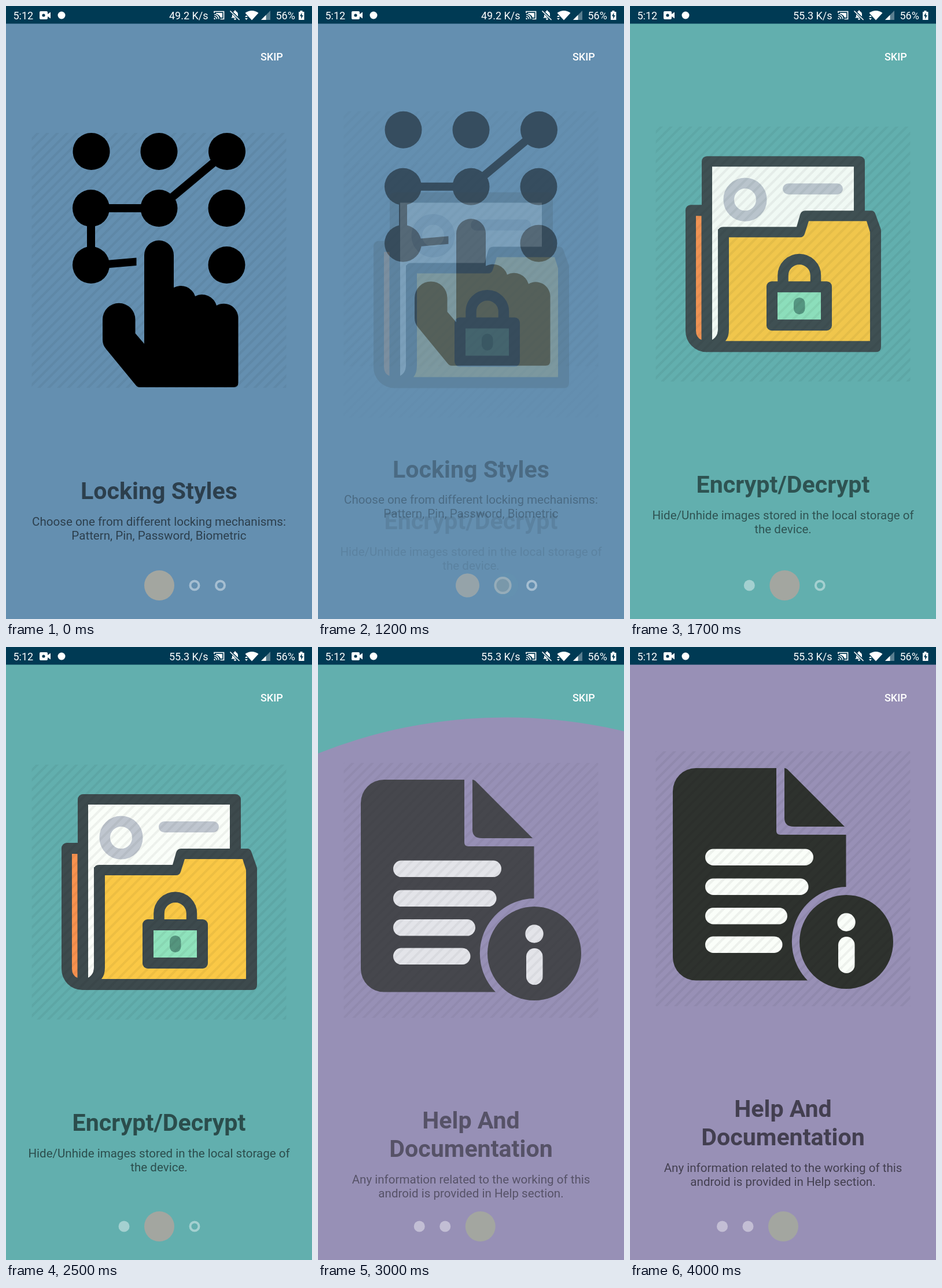
These frames come from a looping animation (529 px wide and 1058 px high, 4100 ms). An HTML page:

```html
<!DOCTYPE html>
<html lang="en">
<head>
<meta charset="utf-8">
<title>Onboarding</title>
<style>
  html, body { margin: 0; width: 100%; height: 100%; overflow: hidden; background: #648fb0; }
  svg { display: block; width: 529px; height: 1058px; }
  text { font-family: Roboto, sans-serif; }
  .title { font-size: 41.15px; font-weight: 700; }
  .sub { font-size: 20.57px; }
  .title, .sub { text-anchor: middle; fill: #000; fill-opacity: .56; }
  .bar text, .skip { font-size: 18px; fill: #fff; }
  .skip { font-weight: 500; }
  .ink { fill: #3d4a4d; }
  .doc { fill: #2e322e; }
  .paper { fill: #fafef9; }
  .line { fill: none; stroke: #000; stroke-width: 14; }
  .icon { fill: #fff; }
  .thin { fill: none; stroke: #fff; stroke-width: 1.7; }
</style>
</head>
<body>
<svg viewBox="0 0 529 1058">
  <defs>
    <pattern id="hatch" width="12" height="12" patternUnits="userSpaceOnUse" patternTransform="rotate(45)">
      <rect width="4" height="12" fill="#000" fill-opacity=".05"/>
    </pattern>
    <clipPath id="content"><rect width="529" height="974"/></clipPath>
  </defs>

  <rect width="529" height="1058" fill="#648fb0"/>
  <circle class="reveal" cx="325" cy="1000" fill="#62afae"/>
  <circle class="reveal" cx="325" cy="1000" fill="#9890b6"/>

  <g clip-path="url(#content)">
    <g class="page">
      <g>
        <circle cx="147.5" cy="251" r="32"/><circle cx="264.5" cy="251" r="32"/><circle cx="382" cy="251" r="32"/>
        <circle cx="147" cy="349" r="32"/><circle cx="264.5" cy="349" r="32"/><circle cx="381.5" cy="349" r="32"/>
        <circle cx="147" cy="447" r="32"/><circle cx="381.5" cy="447" r="32"/>
        <path class="line" d="M382 251L264.5 349H147V447"/>
        <path d="M150 441L225.5 434.5V448L150 454.5Z"/>
        <path d="M239 583V430A25.5 25.5 0 0 1 290 430V486A26 26 0 0 1 327 501A26 26 0 0 1 364 517A25 25 0 0 1 401.500 538V650Q401.500 658 393.500 658H231Q227 658 224 654L173 592Q167 585 167 576V541A28.200 28.200 0 0 1 223.500 541V565Z"/>
      </g>
      <rect x="44.500" y="219" width="440" height="440" fill="url(#hatch)"/>
      <text class="title" x="264.500" y="851">Locking Styles</text>
      <text class="sub" x="264.500" y="896.500">Choose one from different locking mechanisms:</text>
      <text class="sub" x="264.500" y="920.600">Pattern, Pin, Password, Biometric</text>
    </g>

    <g class="page">
      <path class="ink" d="M105 338H133V592H132A36 36 0 0 1 96 556V347A9 9 0 0 1 105 338Z"/>
      <path fill="#f9924f" d="M114 357H123.500V571Q114 567 114 555Z"/>
      <rect class="ink" x="124" y="254" width="282" height="330" rx="9"/>
      <path class="paper" d="M142 272H387V380H152V555Q152 567 142 571Z"/>
      <circle cx="199" cy="329" r="28.300" fill="none" stroke="#bfc6cf" stroke-width="18.500"/>
      <rect x="264" y="301" width="104" height="19" rx="9.500" fill="#bfc6cf"/>
      <path class="ink" d="M161 376H288L294 355Q296 348 303 348H417Q422 348 424 353L433 378Q434 380 434 384V583Q434 592 425 592H132V575Q152 570 152 553V385Q152 376 161 376Z"/>
      <path fill="#fac846" d="M171 394H294Q300 394 302 388L309 366H409L415 385V573H165Q171 566 171 553Z"/>
      <path d="M264.500 475V460A28.200 28.200 0 0 1 321 460V475" fill="none" stroke="#3d4a4d" stroke-width="18.500"/>
      <rect class="ink" x="236" y="470" width="113" height="85" rx="9"/>
      <rect x="255" y="489" width="75" height="47" fill="#8fe2bc"/>
      <rect x="283" y="498" width="19.500" height="29" rx="9.700" fill="#55957e"/>
      <rect x="44.500" y="203" width="440" height="440" fill="url(#hatch)"/>
      <text class="title" x="264.500" y="835">Encrypt/Decrypt</text>
      <text class="sub" x="264.500" y="881">Hide/Unhide images stored in the local storage of</text>
      <text class="sub" x="264.500" y="905">the device.</text>
    </g>

    <g class="page">
      <path class="doc" d="M114 209H253V317Q253 324 260 324H373.500V414A95 95 0 0 0 307 575.500H114A40 40 0 0 1 74 535.500V249A40 40 0 0 1 114 209Z"/>
      <path class="doc" d="M267 209Q269 209 272 211L371 310H283Q267 310 267 295Z"/>
      <circle class="doc" cx="374" cy="509" r="81"/>
      <g class="paper">
        <rect x="130" y="348.500" width="187" height="28.500" rx="14.200"/>
        <rect x="130" y="399.500" width="178.500" height="28.500" rx="14.200"/>
        <rect x="130" y="450" width="142" height="28.500" rx="14.200"/>
        <rect x="130" y="499.500" width="133.500" height="28.500" rx="14.200"/>
        <circle cx="374" cy="475" r="15.700"/>
        <rect x="360" y="500" width="28.500" height="63" rx="14.200"/>
      </g>
      <rect x="44.500" y="180" width="440" height="440" fill="url(#hatch)"/>
      <text class="title" x="264.500" y="811">Help And</text>
      <text class="title" x="264.500" y="859.500">Documentation</text>
      <text class="sub" x="264.500" y="905.500">Any information related to the working of this</text>
      <text class="sub" x="264.500" y="929.600">android is provided in Help section.</text>
    </g>
  </g>

  <g id="pager"></g>
  <text class="skip" x="440" y="93.500">SKIP</text>

  <g class="bar">
    <rect width="529" height="30.500" fill="#003a54"/>
    <text x="12.500" y="22.500">5:12</text>
    <path class="icon" d="M60 9H70Q72 9 72 11V14L77 10.500V21.500L72 18V21Q72 23 70 23H60Q58 23 58 21V11Q58 9 60 9Z"/>
    <circle cx="65" cy="16" r="2.600" fill="#003a54"/>
    <circle class="icon" cx="96" cy="16" r="6.500"/>
    <text id="speed" x="282" y="22.500">49.2 K/s</text>
    <path class="thin" d="M360 12V9.500H376.500V22.500H370.500M360 14.500A8 8 0 0 1 368 22.500M360 18A4.500 4.500 0 0 1 364.500 22.500"/>
    <path class="icon" d="M359.500 20.500A2.500 2.500 0 0 1 362 23H359.500ZM363 12H374V20H371Q369 14.500 363 13.500Z"/>
    <path class="icon" d="M389 20.500L391 18.500V14.500Q391 10 395 9V7.500H397V9Q401 10 401 14.500V18.500L403 20.500ZM394 21.500H398Q398 24 396 24T394 21.500Z"/>
    <path d="M388 8.500L404 24" stroke="#003a54" stroke-width="4"/>
    <path class="thin" d="M387.500 8.500L403.500 24"/>
    <path class="icon" d="M413.500 12Q425 4 436.500 12L425 24.500Z"/>
    <path class="icon" d="M413 19L415.500 16L418 19ZM413 21L415.500 24L418 21Z"/>
    <path class="icon" d="M457 8V24H441Z" fill-opacity=".35"/>
    <path class="icon" d="M449.500 15.500V24H441Z"/>
    <text x="466.500" y="22.500">56%</text>
    <path class="icon" d="M506 10H508.500V8H512.500V10H515.500V24H506Z"/>
    <path d="M511.500 11.500L508 17.500H510.300V22.500L513.800 16H511.500Z" fill="#003a54"/>
  </g>
</svg>
<script>
  const LOOP = 4100, STEP = 100;
  const SMALL = 19, BIG = 52, GAP = 25.5;
  const LIFT = 64, CENTERING = [16, 23];
  const all = q => [...document.querySelectorAll(q)];
  const pages = all('.page'), reveals = all('.reveal');
  const pager = document.getElementById('pager'), speed = document.getElementById('speed');

  const unit = x => Math.min(1, Math.max(0, x));
  const slowOut = x => 1 - (1 - unit(x)) ** 2;
  const smooth = x => (1 - Math.cos(Math.PI * unit(x))) / 2;
  const set = (el, attrs) => { for (const k in attrs) el.setAttribute(k, attrs[k]); };

  function circle() {
    const el = document.createElementNS('http://www.w3.org/2000/svg', 'circle');
    pager.appendChild(el);
    return el;
  }
  const slots = [0, 1, 2].map(() => ({ small: circle(), big: circle() }));

  // Milliseconds into each page change
  const firstClock = t => (t - 1139) * 1.064;
  const secondClock = t => t < 2700 ? t - 2500 : 200 + (t - 2700) * 0.72;

  const phase = ms => ({
    show: slowOut(ms / 800),
    hide: slowOut(ms / 200),
    size: slowOut(ms / 350),
    bar: smooth(ms / 700),
    radius: 1028 * unit(ms / 450) ** 2,
    fade: smooth(ms / 450)
  });

  function place(page, y, alpha) {
    set(page, { transform: `translate(0 ${y})`, opacity: alpha });
  }

  function drawPager(a, b) {
    const weights = [1 - a.size, a.size - b.size, b.size];
    const visited = [true, b.size > 0, false];
    let left = 239 - (SMALL + GAP) * (a.bar + b.bar);
    slots.forEach(({ small, big }, i) => {
      const w = weights[i], d = SMALL + (BIG - SMALL) * w;
      const pos = { cx: left + d / 2, cy: 1000 };
      const ring = !visited[i];
      set(small, {
        ...pos, r: d / 2 - (ring ? 2 : 0), opacity: 0.42 * (1 - w),
        fill: ring ? 'none' : '#fff', stroke: ring ? '#fff' : 'none', 'stroke-width': 4
      });
      set(big, { ...pos, r: d / 2, fill: '#a3a6a0', opacity: w });
      left += d + GAP;
    });
  }

  function draw(t) {
    const a = phase(firstClock(t)), b = phase(secondClock(t));
    const [c1, c2] = CENTERING;
    place(pages[0], -LIFT * a.hide - c1 * a.show, 1 - a.hide);
    place(pages[1], (LIFT + c1) * (1 - a.show) - LIFT * b.hide - c2 * b.show, a.show * (1 - b.hide));
    place(pages[2], (LIFT + c2) * (1 - b.show), b.show);
    [a, b].forEach((p, i) => set(reveals[i], { r: p.radius, opacity: p.fade }));
    drawPager(a, b);
    speed.textContent = t < 1500 ? '49.2 K/s' : '55.3 K/s';
  }

  const start = performance.now();
  function tick() {
    const t = (performance.now() - start) % LOOP;
    draw(Math.floor(t / STEP) * STEP);
    requestAnimationFrame(tick);
  }
  tick();
</script>
</body>
</html>
```
